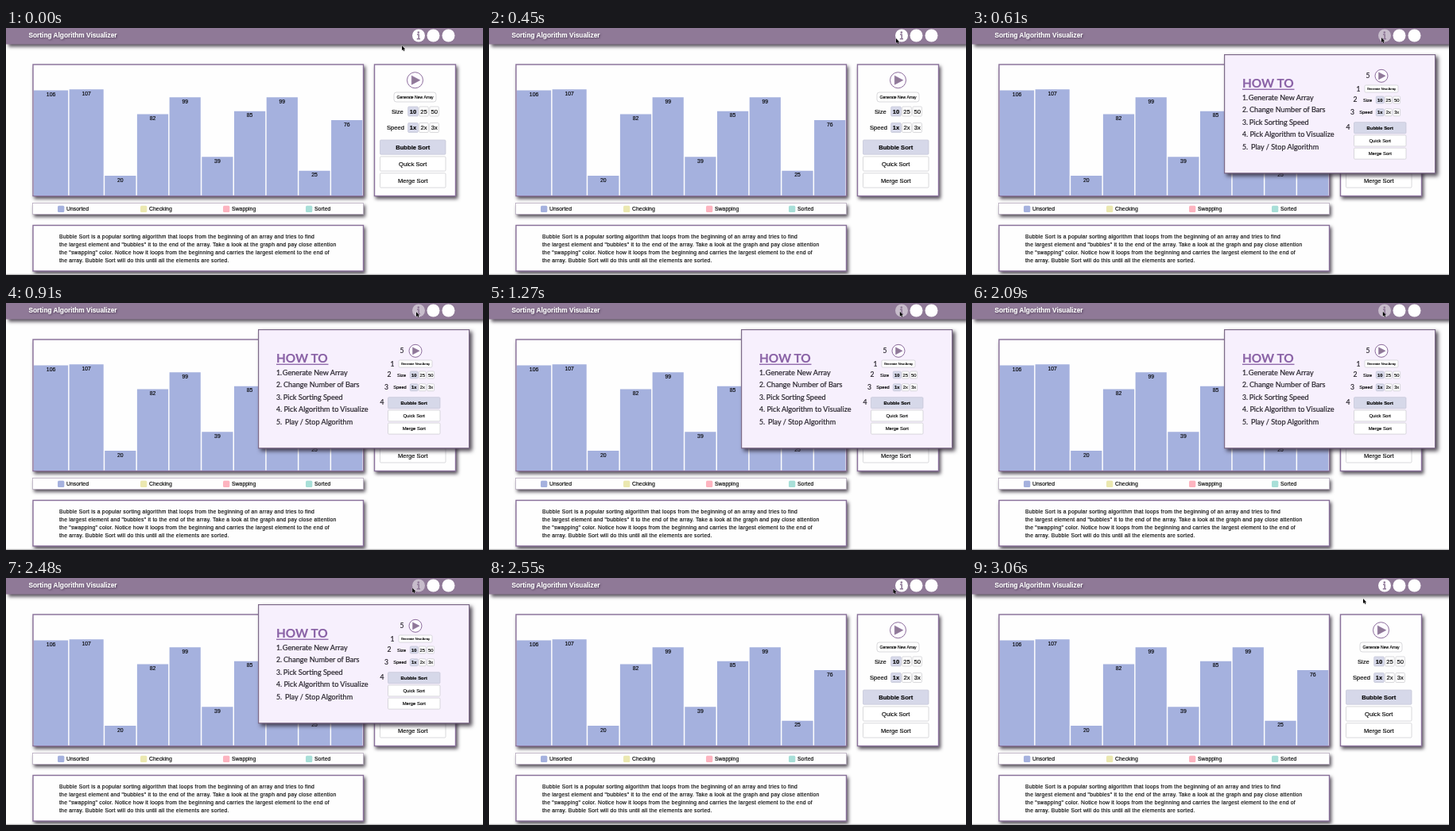
Animation, 600 px wide and 311 px high, one loop 3090 ms. Source, as an HTML page:

```html
<!DOCTYPE html>
<html lang="en">
<head>
<meta charset="utf-8">
<title>Sorting Algorithm Visualizer</title>
<style>
html, body { margin: 0; width: 100%; height: 100%; overflow: hidden; background: #fefefe; }
svg { display: block; width: 600px; height: 311px; font-family: "Liberation Sans", Arial, sans-serif; }
.panel { fill: #fefefe; stroke: #89709a; stroke-width: 1.4; filter: drop-shadow(2.5px 3px 2px rgba(45, 38, 50, .8)); }
.header { fill: #8f7997; filter: drop-shadow(3px 3px 2px rgba(45, 38, 50, .8)); }
.title { filter: drop-shadow(1px 1px 1px rgba(40, 25, 50, .6)); }
.geo { font-family: Lato, sans-serif; }
</style>
</head>
<body>
<svg id="stage" viewBox="0 0 600 311" xmlns="http://www.w3.org/2000/svg"></svg>
<script>
const LOOP = 3090, POPUP_ON = 480, POPUP_OFF = 2500;
const PURPLE = '#8c6c9c', INK = '#000', ACTIVE = '#d6d8e9', UNSORTED = '#a5b1de';
const stage = document.getElementById('stage');

function add(parent, tag, attrs, content) {
  const node = document.createElementNS('http://www.w3.org/2000/svg', tag);
  for (const key in attrs) node.setAttribute(key, attrs[key]);
  if (content !== undefined) node.textContent = content;
  parent.appendChild(node);
  return node;
}
const rect = (parent, x, y, width, height, attrs) =>
  add(parent, 'rect', { x, y, width, height, ...attrs });

// A hairline stroke gives the text its slightly heavier weight
function text(parent, x, y, size, content, attrs) {
  const fill = attrs?.fill ?? INK;
  return add(parent, 'text', { x, y, 'font-size': size, fill, stroke: fill, 'stroke-width': .14, ...attrs }, content);
}
const middle = { 'text-anchor': 'middle' };

function button(parent, x, y, w, h, size, label, active, radius = 1.2) {
  rect(parent, x, y, w, h, {
    rx: radius, fill: active ? ACTIVE : '#fff', stroke: active ? '#c3c4d6' : '#c9c9cd', 'stroke-width': .7
  });
  text(parent, x + w / 2, y + h / 2 + size * .36, size, label,
    { ...middle, 'font-weight': active ? 700 : 400 });
}

function playIcon(parent, x, y, r) {
  add(parent, 'circle', { cx: x, cy: y, r, fill: '#fdfbff', stroke: PURPLE, 'stroke-width': 1 });
  add(parent, 'path', {
    d: `M${x - r * .42} ${y - r * .55}L${x + r * .62} ${y}L${x - r * .42} ${y + r * .55}Z`,
    fill: '#8f7997', stroke: PURPLE, 'stroke-width': .6, 'stroke-linejoin': 'round'
  });
}

function drawHeader() {
  rect(stage, 0, -6, 600, 26.5, { class: 'header' });
  text(stage, 28.5, 11.8, 8.3, 'Sorting Algorithm Visualizer',
    { fill: '#fff', 'font-weight': 700, class: 'title' });
  for (const cx of [537.5, 556.5]) add(stage, 'circle', { cx, cy: 9.5, r: 8, fill: '#fff' });
  const info = add(stage, 'g', {});
  add(info, 'circle', { cx: 519, cy: 9.5, r: 8, fill: '#fff' });
  add(info, 'circle', { cx: 518.8, cy: 5.6, r: 1.3, fill: '#8f7997' });
  add(info, 'path', { d: 'M517 8.3H519.2V13.5M516.8 13.7H521', fill: 'none', stroke: '#8f7997', 'stroke-width': 1.6 });
  return info;
}

function drawChart() {
  rect(stage, 34, 46, 415.5, 165.5, { class: 'panel' });
  let x = 35;
  for (const value of [106, 107, 20, 82, 99, 39, 85, 99, 25, 76]) {
    const width = value > 99 ? 43.1 : 39.2, top = 211 - value * 1.25;
    rect(stage, x, top, width, 211 - top, { fill: UNSORTED });
    text(stage, x + width / 2, top + 7.6, 6.85, value, middle);
    x += width + 1.5;
  }
}

function drawLegend() {
  rect(stage, 33.5, 220.5, 416, 14, { class: 'panel', style: 'stroke:#b8acc0;stroke-width:.8' });
  const entries = { Unsorted: UNSORTED, Checking: '#ebe8b0', Swapping: '#fdb4c0', Sorted: '#a8dfd8' };
  Object.entries(entries).forEach(([label, fill], i) => {
    rect(stage, 65 + 104 * i, 223.7, 8.3, 8.3, { rx: 1.5, fill });
    text(stage, 76 + 104 * i, 230.3, 6.9, label);
  });
}

function drawDescription() {
  rect(stage, 34, 248.5, 415.5, 57.5, { class: 'panel' });
  [
    'Bubble Sort is a popular sorting algorithm that loops from the beginning of an array and tries to find',
    'the largest element and "bubbles" it to the end of the array. Take a look at the graph and pay close attention',
    'the "swapping" color. Notice how it loops from the beginning and carries the largest element to the end of',
    'the array. Bubble Sort will do this until all the elements are sorted.'
  ].forEach((line, i) => text(stage, 67, 264.6 + 10.05 * i, 6.8, line, { 'letter-spacing': .235 }));
  rect(stage, 0, 309.8, 600, 1.2, { fill: '#b9b9bb' });
}

function drawControls() {
  rect(stage, 463.5, 46, 102, 165.5, { class: 'panel' });
  playIcon(stage, 514.5, 65.7, 10);
  button(stage, 488, 81, 53, 12, 5.1, 'Generate New Array', false, 3);
  text(stage, 485, 107.5, 7.6, 'Size');
  text(stage, 479, 127.8, 7.6, 'Speed');
  [['10', '25', '50'], ['1x', '2x', '3x']].forEach((row, r) => row.forEach((label, i) =>
    button(stage, [505.7, 519.8, 533][i], 99 + 20.5 * r, i ? 11.4 : 12.6, 12, 7.6, label, !i)));
  ['Bubble Sort', 'Quick Sort', 'Merge Sort'].forEach((label, i) =>
    button(stage, 470.5, 141 + 20.9 * i, 82.5, 18.2, 7.6, label, !i));
}

function drawPopup() {
  const popup = add(stage, 'g', {});
  rect(popup, 317.6, 33.6, 265, 149.2, {
    class: 'panel',
    style: 'fill:#f7f0fd;stroke:#7d6a88;stroke-width:1.2;filter:drop-shadow(3px 3px 2.5px rgba(45,38,50,.85))'
  });
  const geo = { class: 'geo', fill: '#2c2830', 'stroke-width': .22 };
  text(popup, 340, 74.8, 15.4, 'HOW TO', { class: 'geo', fill: '#8a62a6', 'font-weight': 700 });
  rect(popup, 340, 76.6, 65.5, 1.3, { fill: '#8a62a6' });
  [['Generate New Array', 347.8], ['Change Number of Bars', 349], ['Pick Sorting Speed', 348.8],
   ['Pick Algorithm to Visualize', 349.4], ['Play / Stop Algorithm', 351]].forEach(([label, x], i) => {
    const y = 90.6 + 15.6 * i;
    text(popup, 340, y, 8.6, `${i + 1}.`, geo);
    text(popup, x, y, 9.15, label, geo);
  });
  [[486, 79.6], [482, 93.3], [478.5, 109], [473, 128], [498, 63.4]].forEach(([x, y], i) =>
    text(popup, x, y, 8.6, i + 1, { ...geo, ...middle }));

  playIcon(popup, 515, 60.3, 8);
  button(popup, 494, 72, 42, 9, 4, 'Generate New Array', false, 1.5);
  text(popup, 492, 92.6, 5.7, 'Size');
  text(popup, 487.3, 108.2, 5.7, 'Speed');
  [['10', '25', '50'], ['1x', '2x', '3x']].forEach((row, r) => row.forEach((label, i) =>
    button(popup, [508.3, 519.4, 529.8][i], 86 + 15.8 * r, i ? 8.8 : 9.8, 9, 5.8, label, !i)));
  ['Bubble Sort', 'Quick Sort', 'Merge Sort'].forEach((label, i) =>
    button(popup, 480.5, 118.7 + 16.2 * i, 65.5, 14, 5.9, label, !i));
  return popup;
}

const info = drawHeader();
drawChart();
drawLegend();
drawDescription();
drawControls();
const popup = drawPopup();
const cursor = add(stage, 'path', {
  d: 'M0 0V5.9L1.4 4.7L2.4 6.9L3.4 6.4L2.4 4.4H4.2Z',
  fill: '#000', stroke: '#fff', 'stroke-width': .5, 'paint-order': 'stroke'
});

// Pointer path: time, x, y
const route = [
  [0, 498, 22.3], [450, 512, 13], [610, 515, 12], [1150, 516.8, 10.8],
  [2340, 516.8, 10.8], [2550, 508.5, 13.5], [3060, 492, 26], [LOOP, 492, 26]
];

function pointerAt(t) {
  const i = route.findIndex(point => point[0] > t);
  const [t0, x0, y0] = route[i - 1], [t1, x1, y1] = route[i];
  const k = (t - t0) / (t1 - t0);
  return [x0 + (x1 - x0) * k, y0 + (y1 - y0) * k];
}

function render(t) {
  const hovering = t >= POPUP_ON && t < POPUP_OFF;
  popup.setAttribute('visibility', hovering ? 'visible' : 'hidden');
  info.setAttribute('opacity', hovering ? .5 : 1);
  cursor.setAttribute('transform', `translate(${pointerAt(t)})`);
}

const start = performance.now();
function tick() {
  render((performance.now() - start) % LOOP);
  requestAnimationFrame(tick);
}
tick();
</script>
</body>
</html>
```
